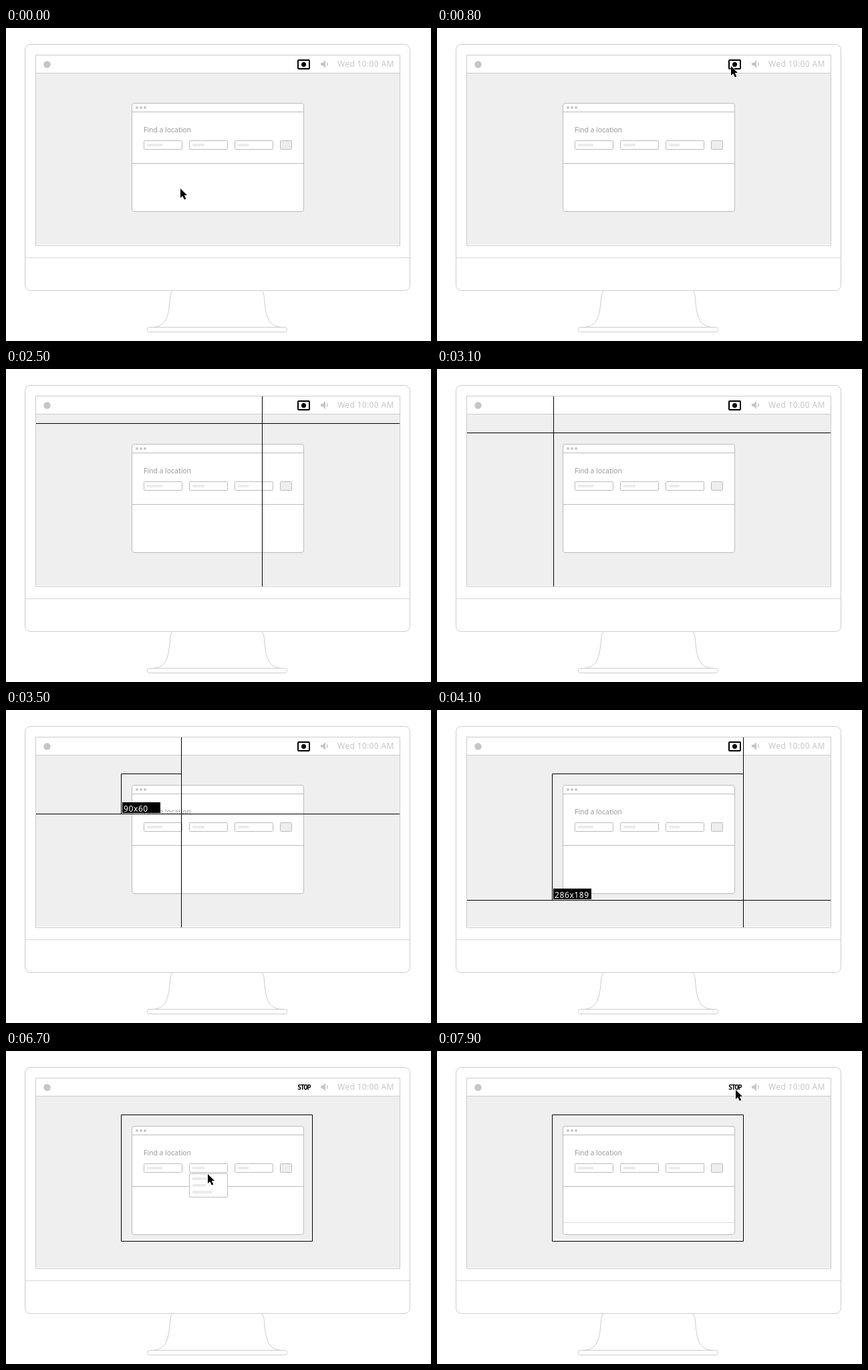
An HTML page for the animation above (8 s loop, 636 by 468 pixels).

```html
<!DOCTYPE html>
<html lang="en">
<head>
<meta charset="utf-8">
<title>Screen recording demo</title>
<style>
  html, body { margin: 0; width: 100%; height: 100%; overflow: hidden; background: #fff; }
  svg { display: block; width: 636px; height: 468px; }
  text { font: 12px "Noto Sans", sans-serif; letter-spacing: .35px; }
  .line { fill: none; stroke: #ccc; }
  .box { fill: #fff; stroke: #bbb; }
  .bar { fill: #ebebeb; }
  .ink { fill: none; stroke: #000; }
  .gray { fill: #c6c6c6; }
  .active { fill: #c4c6c5; }
  #stop { font: 600 10px "Noto Sans Mono", monospace; letter-spacing: -1.2px; }
  #size text { fill: #fff; letter-spacing: .6px; }
</style>
</head>
<body>
<svg viewBox="0 0 636 468">
  <defs>
    <path id="neck" class="line" d="M249.5 393C245 396 246 404 244.5 415C242 436 237 446 220 447.5"/>
    <g id="field"><rect class="box" x=".5" y=".5" width="57" height="13" rx="1"/></g>
    <g id="options">
      <rect class="box" x=".5" y=".5" width="57" height="35" rx="1"/>
      <path stroke="#ebebeb" stroke-width="4" d="M5 8h23M5 18h20M5 28h29"/>
    </g>
  </defs>

  <!-- computer -->
  <rect class="line" x="28.5" y="24.5" width="576" height="368" rx="8"/>
  <path class="line" d="M29 343.5H604" style="stroke:#d8d8d8"/>
  <use href="#neck"/>
  <use href="#neck" transform="matrix(-1 0 0 1 632 0)"/>
  <rect class="line" x="211.5" y="447.5" width="209" height="7" rx="3"/>
  <rect x="45" y="68" width="544" height="256" fill="#efefef"/>
  <path class="line" d="M44.5 40.5H589.5V325.5H44.5ZM45 67.5H589"/>

  <!-- menu bar -->
  <circle class="gray" cx="61.5" cy="54.5" r="5.2"/>
  <rect id="iconActive" class="active" x="431" y="41" width="31" height="27"/>
  <g id="icon">
    <rect x="437" y="48" width="17" height="13" rx="1" fill="#fff" stroke="#000" stroke-width="2"/>
    <circle cx="445.5" cy="54.5" r="3.5"/>
  </g>
  <text id="stop" x="436" y="58">STOP</text>
  <path class="gray" d="M471 52h3l4-4v12l-4-4h-3Z"/>
  <path d="M480 51.5q2.5 2.5 0 5" fill="none" stroke="#c6c6c6" stroke-width="1.5"/>
  <text class="gray" x="496" y="58">Wed 10:00 AM</text>

  <!-- browser window -->
  <rect class="box" x="188.5" y="112.5" width="257" height="162" rx="3.5"/>
  <path class="line" d="M189 125.5H445M189 202.5H445" style="stroke:#bbb"/>
  <g class="gray"><circle cx="196" cy="119" r="2"/><circle cx="202" cy="119" r="2"/><circle cx="208" cy="119" r="2"/></g>
  <text x="206" y="156" fill="#999" style="font-size:10.4px;font-weight:500;letter-spacing:0">Find a location</text>
  <use href="#field" x="206" y="168"/>
  <use href="#field" x="274" y="168"/>
  <use href="#field" x="342" y="168"/>
  <path stroke="#ebebeb" stroke-width="4" d="M211 175h23M279 175h18M347 175h16"/>
  <rect class="box" x="410.5" y="168.5" width="17" height="13" rx="1" style="fill:#eee"/>
  <path id="results" class="line" d="M189 256.5H445" style="stroke:#ddd"/>
  <use id="options1" href="#options" x="206" y="183"/>
  <use id="options2" href="#options" x="274" y="183"/>

  <!-- record menu -->
  <g id="menu">
    <path class="box" d="M431.5 67.5H550.5V90.5q0 4-4 4H435.5q-4 0-4-4Z"/>
    <path id="itemActive" class="active" d="M432 68H550V90.5q0 3.5-3.5 3.5H435.5q-3.5 0-3.5-3.5Z"/>
    <text x="440" y="85">Record</text>
  </g>

  <!-- selection and pointers -->
  <g id="selection">
    <path id="halo" fill="none" stroke="#fafafa" stroke-width="1"/>
    <path id="frame" class="ink"/>
  </g>
  <g id="size"><rect width="57" height="16"/><text x="2" y="13.5"></text></g>
  <path id="cross" class="ink"/>
  <path id="arrow" d="M0 0V14L3.2 11L5.8 16.5L8.3 15.4L5.8 10H10Z" stroke="#fff" stroke-width="1.2" paint-order="stroke"/>
</svg>
<script>
const LOOP = 8000, STEP = 100;
const START = { x: 172, y: 95 };

// Pointer stops: time, x, y
const stops = [
  [0, 261, 240], [900, 446, 51], [1100, 446, 56], [1200, 446, 56],
  [1700, 478, 79], [1800, 456, 75], [1900, 456, 75], [2000, 456, 76], [2200, 456, 76],
  [3100, 174, 95], [3200, 172, 95], [4000, 458, 284], [4400, 458, 284],
  [5000, 300, 234], [5400, 255, 222], [5900, 236, 174], [6050, 236, 176],
  [6250, 238, 200], [6600, 302, 178], [6700, 302, 184], [7000, 298, 214],
  [7100, 298, 214], [7450, 418, 175], [7600, 418, 175], [7900, 447, 58], [8000, 447, 58]
];

const $ = id => document.getElementById(id);
const show = (id, on) => { $(id).style.display = on ? "" : "none"; };
const ease = p => p * p * (3 - 2 * p);

function pointerAt(t) {
  const i = stops.findIndex(s => s[0] > t);
  const [t0, x0, y0] = stops[i - 1], [t1, x1, y1] = stops[i];
  const p = ease((t - t0) / (t1 - t0));
  return { x: Math.round(x0 + (x1 - x0) * p), y: Math.round(y0 + (y1 - y0) * p) };
}

function outline(x, y, w, h) {
  return `M${x + .5} ${y + .5}h${w}v${h}h${-w}Z`;
}

function render(t) {
  const { x, y } = pointerAt(t);
  const within = (from, to) => t >= from && t < to;
  const aiming = within(2300, 4400), dragging = within(3300, 4400);
  const recording = t >= 5000;

  show("iconActive", within(900, 2300));
  show("menu", within(900, 2300));
  show("itemActive", within(1800, 2300));
  show("icon", !recording);
  show("stop", recording);
  $("stop").style.opacity = .75 + .25 * Math.cos((t - 6700) / 400 * 2 * Math.PI);
  show("options1", within(6000, 6300));
  show("options2", within(6600, 7100));
  show("results", t >= 7700);

  show("selection", t >= 3300);
  const w = dragging ? x - START.x : 286, h = dragging ? y - START.y : 189;
  $("frame").setAttribute("d", outline(START.x, START.y, w, h));
  $("halo").setAttribute("d", outline(START.x + 2, START.y + 2, Math.max(0, w - 4), Math.max(0, h - 4)));
  show("size", dragging);
  $("size").setAttribute("transform", `translate(${START.x + 2} ${START.y + h - 17})`);
  $("size").lastChild.textContent = `${w}x${h}`;

  show("cross", aiming);
  $("cross").setAttribute("d", `M${x + .5} 41V325M45 ${y + .5}H589`);
  show("arrow", !aiming);
  $("arrow").setAttribute("transform", `translate(${x} ${y})`);
}

const begin = performance.now();
function tick() {
  const t = (performance.now() - begin) % LOOP;
  render(Math.floor(t / STEP) * STEP);
  requestAnimationFrame(tick);
}
tick();
</script>
</body>
</html>
```
